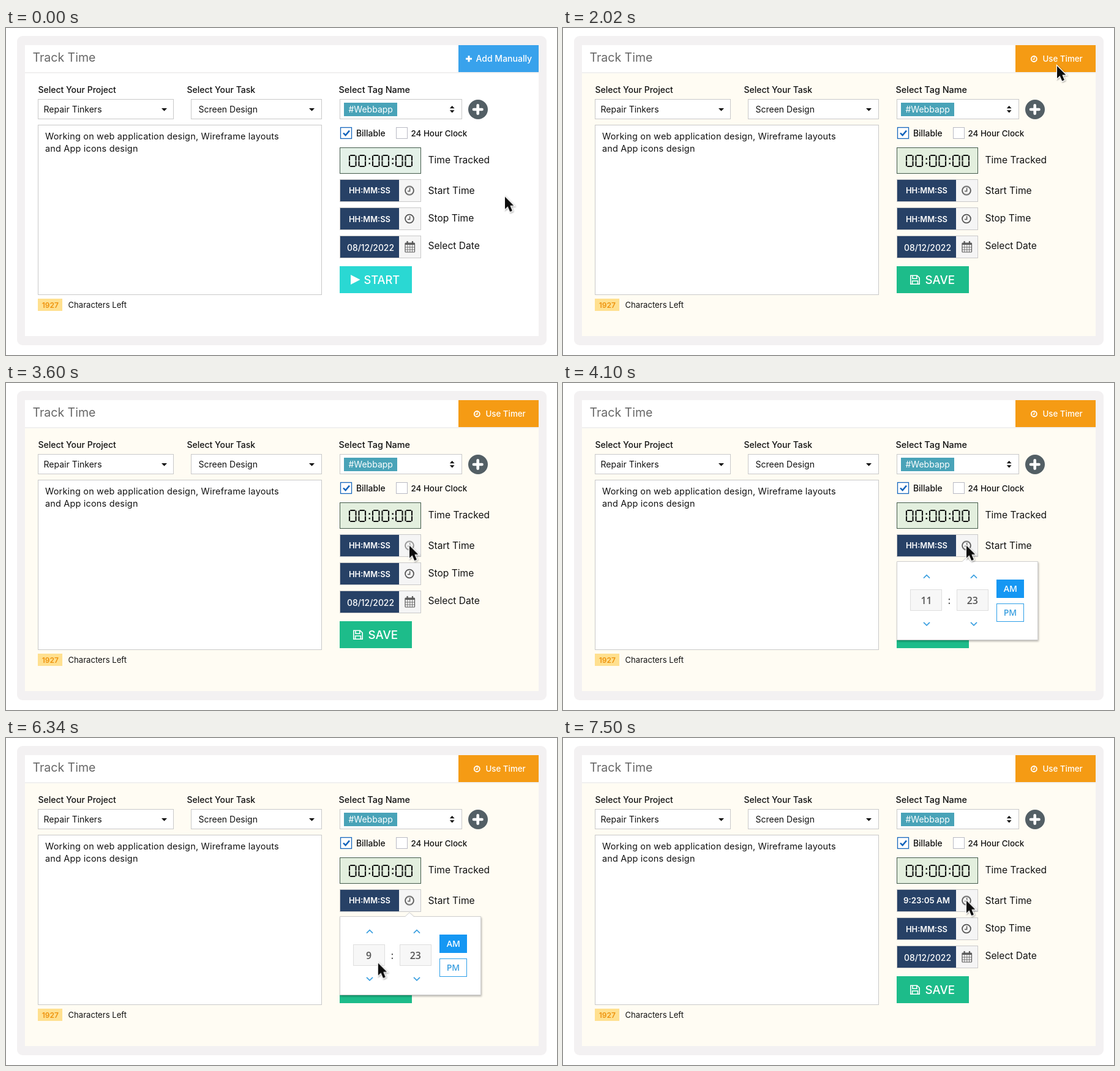
An HTML page for the animation above (8 s loop, 900 by 534 pixels).

```html
<!DOCTYPE html>
<html lang="en">
<head>
<meta charset="utf-8">
<title>Track Time</title>
<style>
html, body { margin: 0; width: 100%; height: 100%; overflow: hidden; background: #fff; }
svg { display: block; width: 900px; height: 534px; }
text { font: 400 14px Inter, sans-serif; fill: #111; }
.label { font-weight: 500; }
.side { font-size: 15.6px; }
.note { font-size: 14.45px; letter-spacing: .2px; }
.white { fill: #fff; }
.mid { text-anchor: middle; }
.value { font-weight: 600; font-size: 12.9px; fill: #fff; text-anchor: middle; }
.big { font-weight: 500; font-size: 18.8px; fill: #fff; }
.pick { font: 600 15.8px "Open Sans", sans-serif; fill: #555; text-anchor: middle; }
.half { font: 600 14px "Open Sans", sans-serif; text-anchor: middle; }
.box { fill: #fff; stroke: #c9c9c9; }
.num { fill: #f7f7f7; stroke: #dedede; }
.line { fill: none; stroke: #555; stroke-width: 1.8; }
.arrow { fill: none; stroke: #3a9fe0; stroke-width: 1.7; }
</style>
</head>
<body>
<svg viewBox="0 0 900 534">
  <defs>
    <g id="clock" class="line"><circle r="6.9"/><path d="M.6-4.2V.9H-3" stroke-width="1.5"/></g>
    <g id="row">
      <rect x="545.5" y=".5" width="132" height="36" fill="#f5f5f5" stroke="#c9c9c9"/>
      <rect x="546" y="1" width="96" height="35" fill="#274166"/>
    </g>
    <path id="zero" d="M2.2 1H10.3M1 1.6V9.4M1 10.6V18.4M11.5 1.6V9.4M11.5 10.6V18.4M2.2 19H10.3" fill="none" stroke="#111" stroke-width="2.1"/>
    <path id="up" class="arrow" d="M-5 2.6L0-2.4L5 2.6"/>
    <path id="down" class="arrow" d="M-5-2.6L0 2.4L5-2.6"/>
    <path id="caret" d="M-4.5-2.5H4.5L0 2.3Z" fill="#111"/>
    <filter id="drop" x="-20%" y="-20%" width="140%" height="150%">
      <feDropShadow dx="1" dy="2" stdDeviation="1.6" flood-opacity=".28"/>
    </filter>
    <filter id="soft" x="-50%" y="-30%" width="220%" height="180%">
      <feDropShadow dx="1" dy="1" stdDeviation="1.3" flood-opacity=".4"/>
    </filter>
  </defs>

  <rect x="18" y="13" width="865" height="505" rx="9" fill="#f3f1f2"/>
  <rect x="31" y="28" width="839" height="475" fill="#fff"/>
  <rect class="manual" x="31" y="73" width="839" height="430" fill="#fffcf3"/>
  <rect x="31" y="72" width="839" height="2" fill="#f1f0f0"/>
  <text x="43.5" y="55" style="font-size:19.5px;fill:#666">Track Time</text>

  <g class="timer">
    <rect x="739" y="28" width="131" height="44" fill="#38a2ec"/>
    <g id="add">
      <path d="M751 50.3H761M756 45.3V55.3" stroke="#fff" stroke-width="3"/>
      <text class="label white" x="767.5" y="55">Add Manually</text>
    </g>
  </g>
  <g class="manual">
    <rect x="739" y="28" width="131" height="44" fill="#f59b14"/>
    <g fill="none" stroke="#fff"><circle cx="769.3" cy="50.5" r="4.5" stroke-width="1.8"/><path d="M769.8 47.5V51.2H767" stroke-width="1.3"/></g>
    <text class="label white" x="783.5" y="55" style="font-size:13.3px">Use Timer</text>
  </g>

  <text class="label" x="52.5" y="106">Select Your Project</text>
  <text class="label" x="295.5" y="106">Select Your Task</text>
  <text class="label" x="543.5" y="106" style="font-size:14.4px">Select Tag Name</text>
  <rect class="box" x="52.5" y="116.5" width="221" height="32"/>
  <rect class="box" x="302.5" y="116.5" width="213" height="32"/>
  <rect class="box" x="545.5" y="116.5" width="199" height="32"/>
  <text x="61.5" y="138">Repair Tinkers</text>
  <text x="314.5" y="137.5">Screen Design</text>
  <use href="#caret" x="258.5" y="133.5"/>
  <use href="#caret" x="499.5" y="133.5"/>
  <rect x="552" y="122" width="87" height="22" fill="#49a3b8"/>
  <text class="white" x="559.5" y="137.5">#Webbapp</text>
  <path d="M724.8 131.3H732.6L728.7 127ZM724.8 134.2H732.6L728.7 138.5Z" fill="#111"/>
  <circle cx="771" cy="133" r="16" fill="#535f65"/>
  <path d="M764 133H777.5M770.7 126.2V139.8" stroke="#fff" stroke-width="4.6" stroke-linecap="round"/>

  <rect class="box" x="52.5" y="158.5" width="463" height="277"/>
  <text class="note" x="64" y="182">Working on web application design, Wireframe layouts</text>
  <text class="note" x="64" y="202">and App icons design</text>
  <rect x="52" y="442" width="40" height="20" fill="#ffe08f"/>
  <text class="mid" x="72.3" y="457" style="font-size:12px;font-weight:600;fill:#ee920c">1927</text>
  <text x="101.5" y="457" style="font-size:13.1px">Characters Left</text>

  <rect x="546.5" y="162.5" width="18" height="18" fill="#fff" stroke="#1466bd" stroke-width="1.3"/>
  <path d="M551 171.5L554.6 175.2L561 167.6" fill="none" stroke="#0f62bb" stroke-width="2.5"/>
  <text class="label" x="572" y="177" style="font-size:13.9px">Billable</text>
  <rect x="637.5" y="162.5" width="18" height="18" fill="#fff" stroke="#b9bac4"/>
  <text class="label" x="661.5" y="177" style="font-size:13.4px">24 Hour Clock</text>

  <rect x="545.5" y="195.5" width="132" height="42" fill="#e4f1e8" stroke="#435a4b"/>
  <rect class="manual" x="546" y="196" width="131" height="41" fill="#e3efde"/>
  <g id="digits"></g>
  <text class="side" x="689.5" y="221">Time Tracked</text>
  <text class="side" x="689.5" y="271">Start Time</text>
  <text class="side" x="689.5" y="316">Stop Time</text>
  <text class="side" x="689.5" y="361">Select Date</text>

  <use href="#row" y="247"/>
  <use href="#row" y="293"/>
  <use href="#row" y="339"/>
  <text id="unset" class="value" x="594" y="270">HH:MM:SS</text>
  <text id="set" class="value" x="594" y="270" style="font-size:13.3px">9:23:05 AM</text>
  <text class="value" x="594" y="317">HH:MM:SS</text>
  <text class="value" x="595.5" y="364" style="font-size:13.9px;font-weight:500">08/12/2022</text>
  <use id="press" href="#clock" x="659" y="265.5"/>
  <use href="#clock" x="659" y="311.5"/>
  <g fill="none" stroke="#5a5a5a">
    <rect x="652" y="351" width="15.5" height="15" rx="1" stroke-width="1.2"/>
    <path d="M652 352.6H667.5" stroke-width="2.8"/>
    <path d="M655.9 354V366M659.8 354V366M663.6 354V366M652 358H667.5M652 362H667.5" stroke-width=".8"/>
    <path d="M655.6 348V352.6M664 348V352.6" stroke-width="2.2"/>
  </g>

  <g class="timer">
    <rect x="545" y="389" width="118" height="44" fill="#2ad8d3"/>
    <path d="M563 403L578.5 411L563 419Z" fill="#fff"/>
    <text class="big" x="584.5" y="418" style="font-size:18.3px">START</text>
  </g>
  <g class="manual">
    <rect x="545" y="389" width="118" height="44" fill="#1dbc8a"/>
    <path d="M567.8 404.3H578.5L582.2 408V418.2H567.8ZM571 404.5V409.3H577.8V404.5M570.6 418V413H579.4V418" fill="none" stroke="#fff" stroke-width="1.6"/>
    <text class="big" x="591.5" y="418">SAVE</text>
  </g>

  <g id="popup">
    <path d="M545.5 291.5H652L659 285L666 291.5H775.5V419.5H545.5Z" fill="#fff" stroke="#cfcfcf" filter="url(#drop)"/>
    <rect class="num" x="567.5" y="337.5" width="51" height="34"/>
    <rect class="num" x="643.5" y="337.5" width="51" height="34"/>
    <use href="#up" x="594" y="316"/><use href="#down" x="594" y="393.5"/>
    <use href="#up" x="671" y="316"/><use href="#down" x="671" y="393.5"/>
    <text class="pick" id="h11" x="593.5" y="361">11</text>
    <text class="pick" id="h10" x="593.5" y="361">10</text>
    <text class="pick" id="h9" x="592.5" y="361">9</text>
    <text class="pick" x="631" y="361">:</text>
    <text class="pick" x="668.7" y="361">23</text>
    <rect x="708" y="321" width="45" height="30" fill="#1597f3"/>
    <text class="half white" x="730.8" y="341">AM</text>
    <rect x="708.5" y="360.5" width="44" height="29" fill="#fff" stroke="#2d9fe8"/>
    <text class="half" x="730.5" y="380" style="fill:#3a9fe0">PM</text>
  </g>

  <g id="cursor">
    <path d="M0 0V20.2L4.6 16L8.2 24.6L12 23L8.4 14.6H14.4Z" fill="#111" stroke="#fff" stroke-width="2.4" paint-order="stroke" filter="url(#soft)"/>
  </g>
</svg>
<script>
const LOOP = 8000, STEP = 40;
const $ = sel => document.querySelectorAll(sel);
const loop = { duration: LOOP, iterations: Infinity };

$('#digits')[0].innerHTML = [560, 598, 636].map(x =>
  `<use href="#zero" x="${x}" y="207"/><use href="#zero" x="${x + 15.5}" y="207"/>`).join('') +
  [593.5, 631.5].map(x =>
  `<path d="M${x - 1} 212.5h2.4v2.4h-2.4zM${x - 1} 220h2.4v2.4h-2.4z" fill="#111"/>`).join('');

// Hard switch: opacity is `on` inside the spans and `off` elsewhere.
function during(sel, spans, on = 1, off = 0) {
  const level = t => spans.some(([a, b]) => t >= a && t < b) ? on : off;
  const times = [...new Set([0, ...spans.flat(), LOOP])].sort((a, b) => a - b);
  const frames = times.map(t => ({ offset: t / LOOP, opacity: level(t), easing: 'step-end' }));
  $(sel).forEach(el => el.animate(frames, loop));
}

during('.timer', [[0, 2020]]);
during('.manual', [[2020, LOOP]]);
during('#add', [[1520, 2020]], .65, 1);
during('#press', [[3600, 4100], [7000, 7500]], .65, 1);
during('#popup', [[4100, 7500]]);
during('#h11', [[0, 5300]]);
during('#h10', [[5300, 5800]]);
during('#h9', [[5800, LOOP]]);
during('#unset', [[0, 7500]]);
during('#set', [[7500, LOOP]]);

// Cursor moves: start time, number of steps, destination.
const home = [815, 275.5], button = [807, 62], clock = [659, 265.5], less = [595, 393];
const moves = [[540, 8, button], [2860, 7, clock], [4640, 5, less], [6340, 5, clock]];
const pose = (t, [x, y], easing = 'step-end') =>
  ({ offset: t / LOOP, transform: `translate(${x}px, ${y}px)`, easing });
const path = [pose(0, home)];
let at = home;
for (const [t, n, to] of moves) {
  path.push(pose(t, at, `steps(${n}, jump-start)`), pose(t + n * STEP, to));
  at = to;
}
path.push(pose(LOOP, at));
$('#cursor')[0].animate(path, loop);
</script>
</body>
</html>
```
